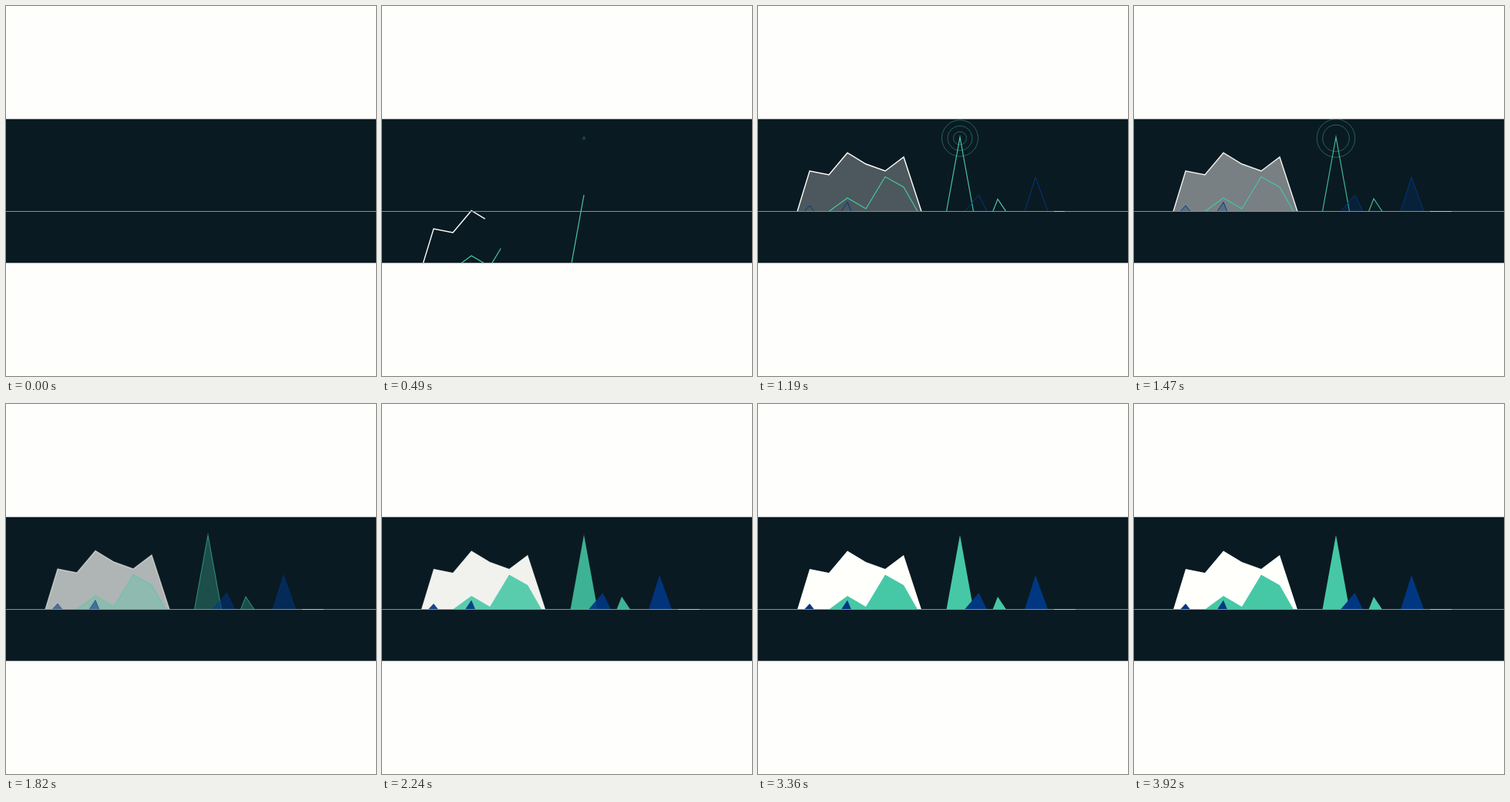
An HTML page with a canvas for the animation above (4760 ms loop, 480 px wide and 480 px high).

```html
<!DOCTYPE html>
<html lang="en">
<head>
<meta charset="utf-8">
<title>Skyline</title>
<style>
html, body { margin: 0; width: 100%; height: 100%; overflow: hidden; background: #fefefc; }
canvas { display: block; width: 480px; height: 480px; }
</style>
</head>
<body>
<canvas id="stage" width="480" height="480"></canvas>
<script>
const ctx = document.getElementById('stage').getContext('2d');
const LOOP = 4760, STEP = 70, ENTER = 560, FILLED = 2330;
const SIZE = 480, GROUND = 266.5, BAND_TOP = 146.67, DROP = 150;
const PAPER = '#fefefc', NIGHT = '#0a1a22', HORIZON = '#8f9080';

// Each tint starts filling at its own time; all finish together.
const WHITE = { colour: '#fffffb', fillStart: 770, line: 1.4 };
const BLUE = { colour: '#003782', fillStart: 1190, line: 1 };
const TEAL = { colour: '#46c8a6', fillStart: 1600, line: 1.2 };

const clamp = v => Math.max(0, Math.min(1, v));
const ramp = (t, from, to) => clamp((t - from) / (to - from));
const smooth = v => v * v * (3 - 2 * v);

const ridge = (tint, start, left, peaks, right) =>
  ({ tint, start, points: [[left, GROUND], ...peaks, [right, GROUND]] });

const RIDGES = [
  ridge(WHITE, 210, 51, [[67, 214], [92, 219], [116, 190.5], [140, 205], [165, 214], [189, 196]], 212),
  ridge(TEAL, 210, 92, [[116, 249], [140, 263], [165, 221.5], [189, 235]], 207),
  ridge(BLUE, 210, 60, [[67, 259]], 73),
  ridge(BLUE, 210, 108, [[116, 254.5]], 121),
  ridge(TEAL, 210, 244.5, [[262, 170]], 279.5),
  ridge(BLUE, 240, 268, [[286.5, 245]], 297),
  ridge(TEAL, 650, 304.5, [[311, 250]], 322),
  ridge(BLUE, 600, 346, [[360, 222]], 376)
];

function trace(points, progress = 1) {
  const length = (a, b) => Math.hypot(b[0] - a[0], b[1] - a[1]);
  const gaps = points.slice(1).map((p, i) => length(points[i], p));
  let left = progress * gaps.reduce((a, b) => a + b);
  ctx.beginPath();
  ctx.moveTo(...points[0]);
  for (let i = 0; i < gaps.length && left > 0; i++) {
    const k = Math.min(1, left / gaps[i]), [x, y] = points[i], [nx, ny] = points[i + 1];
    ctx.lineTo(x + (nx - x) * k, y + (ny - y) * k);
    left -= gaps[i];
  }
}

// Rises from below the band while its outline is drawn, then fills.
function drawRidge({ tint, start, points }, t) {
  const progress = ramp(t, start, start + ENTER);
  if (!progress) return;
  ctx.save();
  ctx.translate(0, DROP * (1 - smooth(progress)));
  ctx.fillStyle = ctx.strokeStyle = tint.colour;
  ctx.lineWidth = tint.line;
  ctx.globalAlpha = ramp(t, tint.fillStart, FILLED);
  trace(points);
  ctx.fill();
  ctx.globalAlpha = 1 - ramp(t, 1400, FILLED);
  trace(points, progress);
  ctx.stroke();
  ctx.restore();
}

function drawSignal(t) {
  const speed = 0.0314, reach = 25.5;
  ctx.strokeStyle = TEAL.colour;
  ctx.lineWidth = 1;
  for (let i = 0; i < 3; i++) {
    const radius = (t - 440 - i * 240) * speed;
    if (radius <= 0 || radius > reach) continue;
    ctx.globalAlpha = 0.42;
    ctx.beginPath();
    ctx.arc(262, 171.5, radius, 0, Math.PI * 2);
    ctx.stroke();
  }
  ctx.globalAlpha = 1;
}

function bar(colour, x, y, w, h) {
  ctx.fillStyle = colour;
  ctx.fillRect(x, y, w, h);
}

function draw(t) {
  const bandHeight = SIZE - 2 * BAND_TOP;
  bar(PAPER, 0, 0, SIZE, SIZE);
  bar(NIGHT, 0, BAND_TOP, SIZE, bandHeight);
  ctx.save();
  ctx.beginPath();
  ctx.rect(0, Math.ceil(BAND_TOP), SIZE, Math.floor(bandHeight));
  ctx.clip();
  drawSignal(t);
  RIDGES.forEach(r => drawRidge(r, t));
  bar(HORIZON, 0, 266, SIZE, 1);
  ctx.globalAlpha = 0.5;
  bar(WHITE.colour, 384, 266, 28 * ramp(t, 980, 1400), 1);
  ctx.restore();
}

const origin = performance.now();
function frame() {
  const t = (performance.now() - origin) % LOOP;
  draw(Math.floor(t / STEP) * STEP);
  requestAnimationFrame(frame);
}
frame();
</script>
</body>
</html>
```
